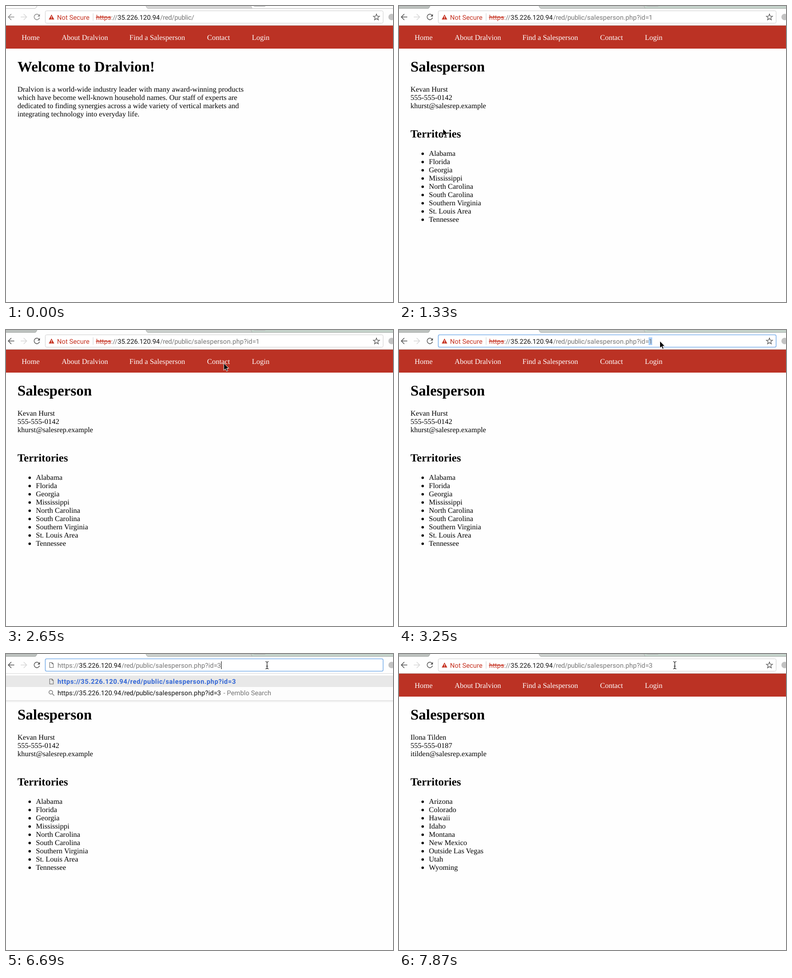
An HTML page that plays this animation: 842 by 646 pixels, repeating every 8 s.

```html
<!DOCTYPE html>
<html lang="en">
<head>
<meta charset="utf-8">
<title>Salesperson page</title>
<style>
  html, body { margin: 0; width: 100%; height: 100%; overflow: hidden; background: #fefefe; }
  svg { display: block; }
  text { font: 16px "Liberation Serif", Times, serif; white-space: pre; text-rendering: geometricPrecision; }
  .h1 { font-size: 32px; font-weight: bold; }
  .h2 { font-size: 24px; font-weight: bold; }
  .ui { font: 14.35px Roboto, Inter, sans-serif; }
  .bold { font-weight: 700; letter-spacing: .54px; fill: #3367d6; }
  .folder { letter-spacing: -.25px; }
  .file { letter-spacing: .16px; }
  .grey { fill: #757575; }
  .ink { fill: #111; }
  .red { fill: #c5301f; }
  .line { fill: none; stroke-width: 1.5; }
</style>
</head>
<body>
<svg id="stage" width="842" height="646" viewBox="0 0 842 646"></svg>
<script>
const LOOP = 8000;
const stage = document.getElementById('stage');

const people = {
  1: {
    lines: ['Kevan Hurst', '555-555-0142', 'khurst@salesrep.example'],
    areas: ['Alabama', 'Florida', 'Georgia', 'Mississippi', 'North Carolina',
      'South Carolina', 'Southern Virginia', 'St. Louis Area', 'Tennessee']
  },
  3: {
    lines: ['Ilona Tilden', '555-555-0187', 'itilden@salesrep.example'],
    areas: ['Arizona', 'Colorado', 'Hawaii', 'Idaho', 'Montana',
      'New Mexico', 'Outside Las Vegas', 'Utah', 'Wyoming']
  }
};

const intro = [
  'Dralvion is a world-wide industry leader with many award-winning products',
  'which have become well-known household names. Our staff of experts are',
  'dedicated to finding synergies across a wide variety of vertical markets and',
  'integrating technology into everyday life.'
];

const menu = [[34, 'Home'], [121, 'About Dralvion'], [268.5, 'Find a Salesperson'],
  [437.5, 'Contact'], [535, 'Login']];

const text = (x, y, s, cls = '', fill = '') =>
  `<text x="${x}" y="${y}" class="${cls}"${fill && ` fill="${fill}"`}>${s}</text>`;
const rect = (x, y, w, h, fill, more = '') =>
  `<rect x="${x}" y="${y}" width="${w}" height="${h}" fill="${fill}" ${more}/>`;
const path = (d, stroke, width = 1.5) =>
  `<path d="${d}" class="line" stroke="${stroke}" style="stroke-width:${width}"/>`;
const rows = (list, x, y) => list.map((s, i) => text(x, y + 18 * i, s)).join('');

function tabs(active) {
  const side = active ? '#bcc1be' : '#fdfdfd';
  const next = active ? '#cbd0cd' : '#d6d6d6';
  const rest = active ? '#c5d3cb' : '#fdfdfd';
  const edge = active ? '#a9adab' : '#bdbdbd';
  return `<path d="M0 0H68L65 5.5H0Z" fill="${side}"/>`
    + `<path d="M304 0H533L536 5.5H308Z" fill="${next}"/>`
    + `<path d="M533 0H842V5.5H536Z" fill="${rest}"/>`
    + '<path d="M538 0H565L563 1.5H541Z" fill="#bdbfbe"/>'
    + path('M0 5.5H63Q65.5 5 67.5 0M304.5 0Q306 5 308.5 5.5H842M533 0L535.5 5.5', edge, 1);
}

function buttons(active) {
  const ink = active ? '#555' : '#8c8c8c';
  return path('M18 24H5.5M11.5 17.5L5 24L11.5 30.5', ink)
    + path('M32 24H45M38.5 17.5L45 24L38.5 30.5', '#d8d8d8')
    + path('M72 20.2A6 6 0 1 0 73 25.5', ink)
    + `<path d="M73.8 17.5V23H68.3Z" fill="${ink}"/>`
    + '<circle cx="839" cy="24" r="7" fill="#c2c2c2"/>';
}

const star = path(Array.from({ length: 10 }, (_, i) => {
  const a = i * Math.PI / 5, r = i % 2 ? 3 : 7;
  return (i ? 'L' : 'M') + (806 + r * Math.sin(a)).toFixed(1) + ' ' + (24.6 - r * Math.cos(a)).toFixed(1);
}).join('') + 'Z', '#5a5a5a', 1.3);

const sheet = (x, y) =>
  path(`M${x} ${y}H${x + 5}L${x + 8} ${y + 3}V${y + 11}H${x}ZM${x + 5} ${y}V${y + 3}H${x + 8}`, '#666', 1.1);

// Host, folder, file and id start at fixed offsets from the scheme.
function address(x, y, id, tone, scheme = 'https://') {
  const cls = 'ui ' + tone;
  const base = text(x, y, scheme, cls)
    + text(x + 46.7, y, '35.226.120.94', 'ui ink')
    + text(x + 139.5, y, '/red/public/', cls + ' folder');
  return id ? base + text(x + 213.3, y, 'salesperson.php?id=', cls + ' file')
    + text(x + 347.5, y, id, cls) : base;
}

function bar(s) {
  let out = s.focus
    ? rect(85.5, 10.5, 735, 27, '#fff', 'rx="3" stroke="#7db1ea" stroke-width="1.6"')
    : rect(85.5, 10.5, 735, 27, '#fff', 'rx="3" stroke="#cdcdcd"');
  if (s.pick) out += rect(s.pick, 16, 551 - s.pick, 17, '#a9cffb');
  if (s.plain) {
    out += sheet(95, 18.5) + address(112, 29.5, s.id, 'grey');
  } else {
    out += '<path d="M99 18.5L105 29.5H93Z" fill="#c5301f"/>'
      + rect(98.4, 22, 1.3, 4, '#fff') + rect(98.4, 27, 1.3, 1.3, '#fff')
      + text(111, 29.5, 'Not Secure', 'ui red')
      + rect(189, 16, 1, 16, '#d0d0d0')
      + address(196, 29.5, s.id, 'grey', '<tspan class="red">https</tspan>://')
      + rect(195.5, 24, 33.5, 1.3, '#c5301f') + star;
  }
  if (s.caret) out += rect(s.caret, 16, 1, 17, '#000');
  return out;
}

function suggestions(id) {
  const shift = 8 * (id.length - 1);
  return rect(0, 42, 842, 60, '#fdfdfd') + rect(0, 42, 842, 1, '#d9d9d9')
    + rect(0, 47, 842, 25, '#e8e8e8')
    + rect(0, 101, 842, 1, '#dcdcdc') + rect(0, 102, 842, 3, '#f1f1f1')
    + sheet(95, 54.5)
    + text(112, 65, 'https://35.226.120.94/red/public/salesperson.php?id=' + id, 'ui bold')
    + '<circle cx="97.5" cy="83.5" r="4" class="line" stroke="#777"/>'
    + path('M100.5 86.5L105 91', '#777')
    + address(112, 90, id, 'ink')
    + text(473 + shift, 90, '- Pemblo Search', 'ui grey');
}

function page(id) {
  const out = rect(0, 42, 842, 1, '#b9a5a2') + rect(0, 43, 842, 50, '#bb3224')
    + menu.map(([x, s]) => text(x, 74, s, '', '#fff')).join('');
  if (!id) return out + text(25, 143, 'Welcome to Dralvion!', 'h1') + rows(intro, 25, 187);
  const { lines, areas } = people[id];
  return out + text(25, 143, 'Salesperson', 'h1') + rows(lines, 25, 187)
    + text(25, 287, 'Territories', 'h2') + rows(areas, 65, 327)
    + areas.map((_, i) => `<circle cx="51.5" cy="${322.5 + 18 * i}" r="2.7"/>`).join('');
}

const arrow = (x, y) =>
  `<path transform="translate(${x.toFixed(1)} ${y.toFixed(1)})" d="M0 0V15.5L3.6 12.2L6 17.6L8.6 16.5L6.2 11.2H11Z" stroke="#fff"/>`;

function beam(x, y) {
  const d = `M${x - 3.5} ${y - 8}Q${x} ${y - 8} ${x} ${y - 5}V${y + 5}Q${x} ${y + 8} ${x - 3.5} ${y + 8}`
    + `M${x + 3.5} ${y - 8}Q${x} ${y - 8} ${x} ${y - 5}M${x} ${y + 5}Q${x} ${y + 8} ${x + 3.5} ${y + 8}M${x - 2} ${y + 2}H${x + 2}`;
  return path(d, '#fff', 3) + path(d, '#111', 1.2);
}

function pointer(t) {
  if (t < 1180) return '';
  if (t >= 6690) return beam(t < 7720 ? 568 : t < 7870 ? 584 : 600, 24.5);
  const step = Math.floor((t - 1910) / 148.5) + 1;
  const p = Math.min(1, Math.max(0, step / 7));
  const k = p * p * (3 - 2 * p);
  return arrow(95.5 + 472 * k, 268 - 244 * k);
}

function state(t) {
  const within = (a, b) => t >= a && t < b;
  const typing = within(4750, 6830);
  const extra = within(4890, 5640);
  const blink = within(5340, 5640) || within(6240, 6690);
  return {
    active: t >= 1180,
    person: t < 1180 ? 0 : t < 6980 ? 1 : 3,
    id: t < 1180 ? '' : t < 4750 ? '1' : extra ? '32' : '3',
    focus: within(2950, 6830),
    pick: within(2950, 3250) ? 196 : within(3250, 4750) ? 543 : 0,
    plain: within(4750, 6980),
    caret: typing && !blink ? (extra ? 476 : 468) : 0,
    typing
  };
}

function scene(t) {
  const s = state(t);
  return rect(0, 0, 842, 646, '#fefefe') + page(s.person)
    + tabs(s.active) + buttons(s.active) + bar(s)
    + (s.typing ? suggestions(s.id) : '') + pointer(t);
}

const start = performance.now();
let shown = '';
function draw() {
  const markup = scene((performance.now() - start) % LOOP);
  if (markup !== shown) stage.innerHTML = shown = markup;
  requestAnimationFrame(draw);
}
draw();
</script>
</body>
</html>
```
